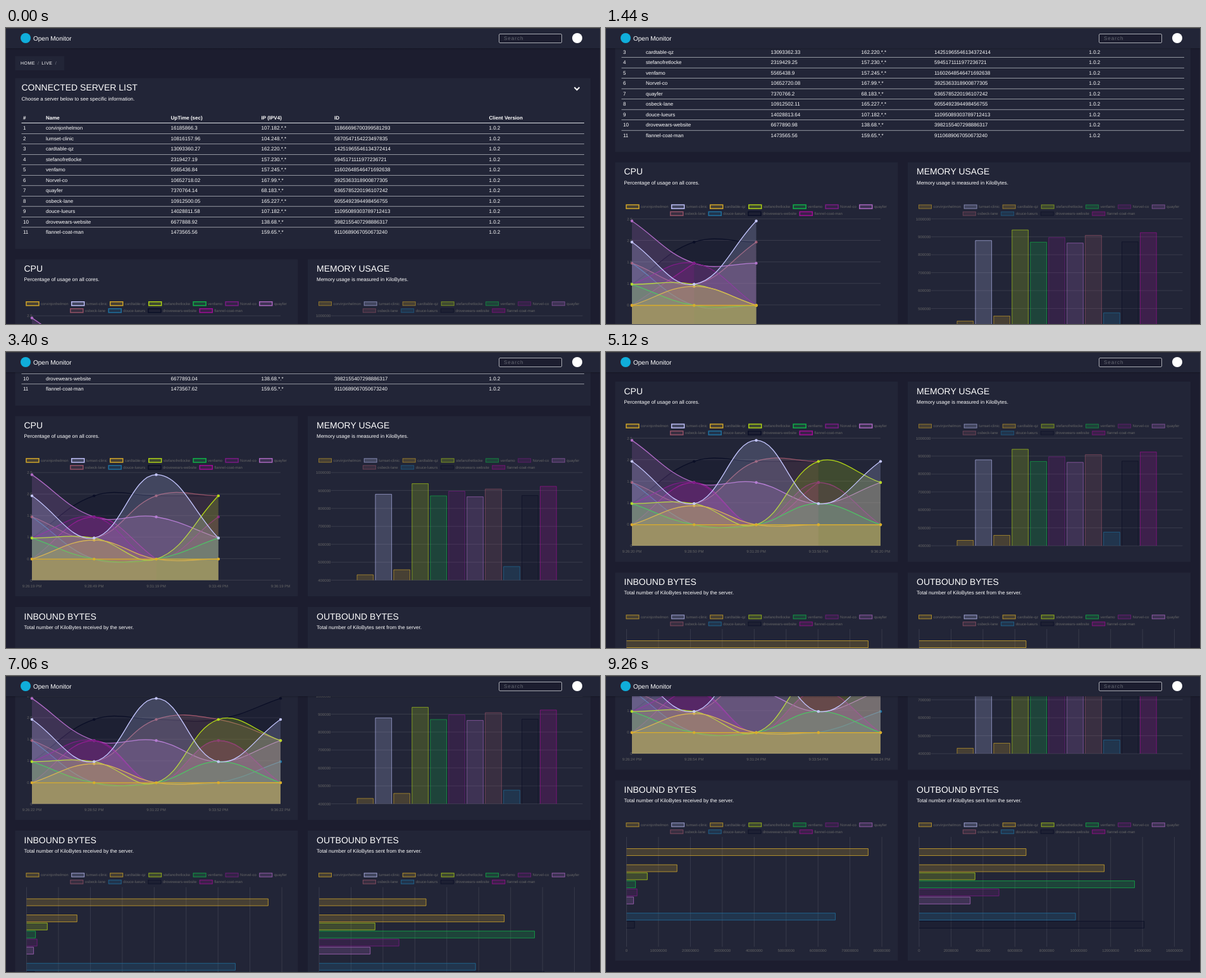
Write an HTML page with a canvas that moves like this. It is 939x469 px and loops after 9.28 s.

```html
<!DOCTYPE html>
<html lang="en">
<head>
<meta charset="utf-8">
<title>Open Monitor</title>
<style>
  html, body { margin: 0; width: 100%; height: 100%; overflow: hidden; background: #1c1d2f; }
  canvas { display: block; }
</style>
</head>
<body>
<canvas id="stage" width="939" height="469"></canvas>
<script>
const ctx = document.getElementById('stage').getContext('2d');
const W = 939, H = 469, LOOP = 9280;
const BG = '#1c1d2f', PANEL = '#222537', GRID = 'rgba(255,255,255,.1)', LABEL = '#666';
const FONT = '"Liberation Sans", Arial, sans-serif';
const UPDATE_EVERY = 2100, UPTIME_STEP = 2.06;

// Name, colour, uptime, address and id of every server
const servers = `
corvinjonhelmon #d9ac2a 16185866.3 107.182 11866696700399581293
lumset-clinic #c4c6ff 10816157.96 104.248 5870547154223497835
cardtable-qz #d9ac2a 13093360.27 162.220 14251965546134372414
stefanofretlocke #b4d916 2319427.19 157.230 5945171111977236721
venfamo #10b848 5565436.84 157.245 11602648546471692638
Norvel-co #7f1b88 10652718.02 167.99 3925363318900877305
quayfer #b06ac6 7370764.14 68.183 6365785220196107242
osbeck-lane #985468 10912500.05 165.227 6055492394498456755
douce-lueurs #2074a4 14028811.58 107.182 11095089303789712413
drovewears-website #0a0e26 6677888.92 138.68 3982155407298886317
flannel-coat-man #a80c9a 1473565.56 159.65 9110689067050673240
`.trim().split('\n').map((line, i) => {
  const [name, color, uptime, ip, id] = line.split(' ');
  // The first seven report together, then the next three, then the last
  return { name, color, uptime: +uptime, ip, id, firstUpdate: i < 7 ? 100 : i < 10 ? 1120 : 1960 };
});

// Chart values in server order: CPU in steps of 0.49 %, memory in MB, traffic in GB
const CPU_STEP = .49;
const cpuLevels = [
  [1, 1, 1, 1, 1], [4, 2, 5, 2, 4], [1, 1.9, 1, 1, 1], [2, 2, 1, 4, 3], [2, 1, 1, 2, 1], [2, 3, 1, 3, 1],
  [5, 3, 3, 2, 3], [3, 2, 4, 4, 3], [3, 1, 1, 1, 2], [2, 4, 4, 4, 5], [1, 3, 1, 3, 1],
];
const memory = [430, 879, 458, 938, 870, 896, 865, 908, 476, 872, 923];
const inbound = [75.7, 0, 15.8, 6.5, 2.8, 3.3, 2.2, 0, 65.4, 2.5, 0];
const outbound = [6.7, 0, 11.6, 3.5, 13.5, 5, 3.2, 0, 9.8, 14.1, 0];

// Scroll strokes: start, end, distance
const strokes = [
  [100, 540, 80], [1060, 1440, 73.5], [1440, 1940, 53.5], [2200, 3400, 58], [3780, 3920, 19],
  [4680, 5120, 35.5], [5280, 5960, 51.5], [6220, 6920, 53], [7380, 7440, 15], [7940, 8720, 64.5],
];
const scrollAt = t => strokes.reduce((sum, [start, end, distance]) =>
  sum + distance * Math.min(1, Math.max(0, (t - start) / (end - start))), 0);
const updateCount = (s, t) => Math.max(0, Math.floor((t - s.firstUpdate) / UPDATE_EVERY) + 1);

// Text placed by the vertical middle of its capitals
function text(str, x, y, size, { color = '#fff', align = 'left', weight = '', spacing = 0 } = {}) {
  ctx.font = `${weight} ${size}px ${FONT}`;
  ctx.letterSpacing = spacing + 'px';
  ctx.textAlign = align;
  ctx.fillStyle = color;
  ctx.fillText(str, x, y + size * .36);
}
function rect(x, y, w, h, color) {
  ctx.fillStyle = color;
  ctx.fillRect(x, y, w, h);
}
function disc(x, y, r, color) {
  ctx.fillStyle = color;
  ctx.beginPath();
  ctx.arc(x, y, r, 0, 7);
  ctx.fill();
}
function withAlpha(alpha, color, draw) {
  ctx.globalAlpha = alpha;
  ctx.fillStyle = ctx.strokeStyle = color;
  draw();
  ctx.globalAlpha = 1;
}

function serverTable(t) {
  rect(14.5, 79.5, 909.5, 270.5, PANEL);
  text('CONNECTED SERVER LIST', 24.5, 93.7, 14);
  text('Choose a server below to see specific information.', 24.5, 112, 8);
  ctx.strokeStyle = '#fff';
  ctx.lineWidth = 2;
  ctx.beginPath();
  ctx.moveTo(898.5, 94);
  ctx.lineTo(902.5, 98);
  ctx.lineTo(906.5, 94);
  ctx.stroke();

  const columns = [27, 63, 260.5, 403.5, 519, 763.5];
  const row = (cells, y, weight) => cells.forEach((c, i) => text(c, columns[i], y, 8, { weight }));
  row(['#', 'Name', 'UpTime (sec)', 'IP (IPV4)', 'ID', 'Client Version'], 141.8, 'bold');
  rect(24.5, 150, 889.5, 1, '#dee2e6');
  servers.forEach((s, i) => {
    const y = 158.6 + 16.5 * i;
    const uptime = +(s.uptime + UPTIME_STEP * updateCount(s, t)).toFixed(2);
    row([i + 1, s.name, uptime, s.ip + '.*.*', s.id, '1.0.2'], y);
    if (i < 10) rect(24.5, 167 + 16.5 * i, 889.5, .6, '#dee2e6');
  });
}

function legend(center, y, lineWidth, alpha) {
  ctx.font = `6px ${FONT}`;
  ctx.letterSpacing = '0px';
  const width = s => 28 + ctx.measureText(s.name).width;
  [servers.slice(0, 7), servers.slice(7)].forEach((line, n) => {
    let x = center + 2.5 - line.reduce((sum, s) => sum + width(s), 0) / 2;
    const mid = y + 11 * n;
    for (const s of line) {
      withAlpha(.2, s.color, () => ctx.fillRect(x, mid - 3, 20, 6));
      ctx.lineWidth = lineWidth;
      withAlpha(alpha, s.color, () => ctx.strokeRect(x, mid - 3, 20, 6));
      text(s.name, x + 23, mid, 6, { color: LABEL });
      x += width(s);
    }
  });
}

function panel(x, y, title, subtitle, lineWidth, alpha) {
  rect(x, y, 447, 285.5, PANEL);
  text(title, x + 14, y + 14.5, 14);
  text(subtitle, x + 14, y + 32.1, 8);
  legend(x + 223.4, y + 70.3, lineWidth, alpha);
}

const PLOT_TOP = 456, PLOT_BOTTOM = 626.5;

// Smooth path through the points, tension 0.4, kept inside the plot
function spline(points) {
  const clamp = y => Math.min(PLOT_BOTTOM, Math.max(PLOT_TOP, y));
  const handles = points.map((p, i) => {
    const a = points[i - 1] || p, b = points[i + 1] || p;
    const before = Math.hypot(p.x - a.x, p.y - a.y), after = Math.hypot(b.x - p.x, b.y - p.y);
    const at = d => {
      const k = .4 * d / (before + after);
      return [p.x + k * (b.x - a.x), clamp(p.y + k * (b.y - a.y))];
    };
    return { into: at(-before), out: at(after) };
  });
  const path = new Path2D();
  path.moveTo(points[0].x, points[0].y);
  for (let i = 1; i < points.length; i++)
    path.bezierCurveTo(...handles[i - 1].out, ...handles[i].into, points[i].x, points[i].y);
  return path;
}

function cpuChart(t) {
  const xAt = i => 41 + 98.25 * i, yAt = v => PLOT_BOTTOM - 68.2 * v;
  for (let v = 0; v <= 2.5; v += .5) {
    rect(41, yAt(v) - .5, 393, 1, GRID);
    text(v ? v.toFixed(1) : '0', 41.5, yAt(v), 6, { color: LABEL, align: 'right' });
  }
  const two = n => String(n).padStart(2, '0');
  for (let i = 0; i < 5; i++) {
    const sec = 26 * 60 + Math.floor(15.7 + t / 1000) + 150 * i;
    text(`9:${two(Math.floor(sec / 60))}:${two(sec % 60)} PM`, xAt(i), 635.5, 6, { color: LABEL, align: 'center' });
  }
  for (let n = servers.length - 1; n >= 0; n--) {
    const { color } = servers[n];
    const points = cpuLevels[n].slice(0, 2 + updateCount(servers[n], t))
      .map((level, i) => ({ x: xAt(i), y: yAt(level * CPU_STEP) }));
    const line = spline(points), area = new Path2D(line);
    area.lineTo(points.at(-1).x, PLOT_BOTTOM);
    area.lineTo(points[0].x, PLOT_BOTTOM);
    withAlpha(.2, color, () => ctx.fill(area));
    ctx.strokeStyle = color;
    ctx.lineWidth = 1.3;
    ctx.stroke(line);
    for (const p of points) disc(p.x, p.y, 2.2, color);
  }
}

// A tinted bar, outlined along the path of its corners
function bar(color, alpha, corners) {
  const path = new Path2D();
  corners.forEach(([x, y]) => path.lineTo(x, y));
  withAlpha(.2, color, () => ctx.fill(path));
  ctx.lineWidth = 1;
  withAlpha(alpha, color, () => ctx.stroke(path));
}

function memoryChart() {
  const yAt = k => PLOT_BOTTOM - (k - 400) * 170.5 / 600;
  for (let k = 400; k <= 1000; k += 100) {
    rect(514, yAt(k) - .5, 397.5, 1, GRID);
    text(k + '000', 513.3, yAt(k), 6, { color: LABEL, align: 'right' });
  }
  servers.forEach((s, i) => {
    const x = 555 + 28.95 * i, top = yAt(memory[i]);
    bar(s.color, .6, [[x, PLOT_BOTTOM], [x, top], [x + 25.7, top], [x + 25.7, PLOT_BOTTOM]]);
  });
}

function trafficChart(left, values, stepMillions) {
  for (let i = 0; i <= 8; i++) {
    const x = left + 50.45 * i;
    rect(x - .5, 758.5, 1, 174, GRID);
    text(i * stepMillions * 1e6, x, 938, 6, { color: LABEL, align: 'center' });
  }
  servers.forEach((s, i) => {
    if (!values[i]) return;
    const top = 777 + 12.78 * i, right = left + 50.45 * values[i] / stepMillions;
    bar(s.color, .75, [[left, top], [right, top], [right, top + 11], [left, top + 11]]);
  });
}

function header() {
  const shadow = ctx.createLinearGradient(0, 32, 0, 35);
  shadow.addColorStop(0, 'rgba(0,0,0,.18)');
  shadow.addColorStop(1, 'rgba(0,0,0,0)');
  rect(0, 32, W, 3, shadow);
  rect(0, 0, W, 32, PANEL);
  rect(0, 0, W, 1, '#333439');
  disc(31, 16, 8, '#10aedb');
  text('Open Monitor', 43, 16.2, 10);
  rect(779, 9, 100, 15, BG);
  ctx.strokeStyle = '#a9abb3';
  ctx.lineWidth = 1;
  ctx.beginPath();
  ctx.roundRect(779.5, 9.5, 99, 14, 1.5);
  ctx.stroke();
  text('Search', 787, 16.4, 8, { color: '#666974', spacing: 1 });
  disc(903, 16, 8, '#fff');
}

function draw(t) {
  ctx.textRendering = 'geometricPrecision';
  rect(0, 0, W, H, BG);
  ctx.save();
  ctx.translate(0, -scrollAt(t));
  rect(14.5, 44.5, 77.5, 22.5, PANEL);
  text('HOME', 23, 55.6, 7, { spacing: .5 });
  text('LIVE', 56.3, 55.6, 7, { spacing: .5 });
  for (const x of [50, 77.8]) text('/', x, 55.6, 7, { color: '#7b7f8c' });
  serverTable(t);
  panel(14.5, 366.5, 'CPU', 'Percentage of usage on all cores.', 1.5, .95);
  panel(477, 366.5, 'MEMORY USAGE', 'Memory usage is measured in KiloBytes.', 1, .55);
  panel(14.5, 669, 'INBOUND BYTES', 'Total number of KiloBytes received by the server.', 1, .75);
  panel(477, 669, 'OUTBOUND BYTES', 'Total number of KiloBytes sent from the server.', 1, .75);
  cpuChart(t);
  memoryChart();
  trafficChart(32.5, inbound, 10);
  trafficChart(495, outbound, 2);
  ctx.restore();
  header();
}

const start = performance.now();
function tick() {
  draw((performance.now() - start) % LOOP);
  requestAnimationFrame(tick);
}
tick();
</script>
</body>
</html>
```
